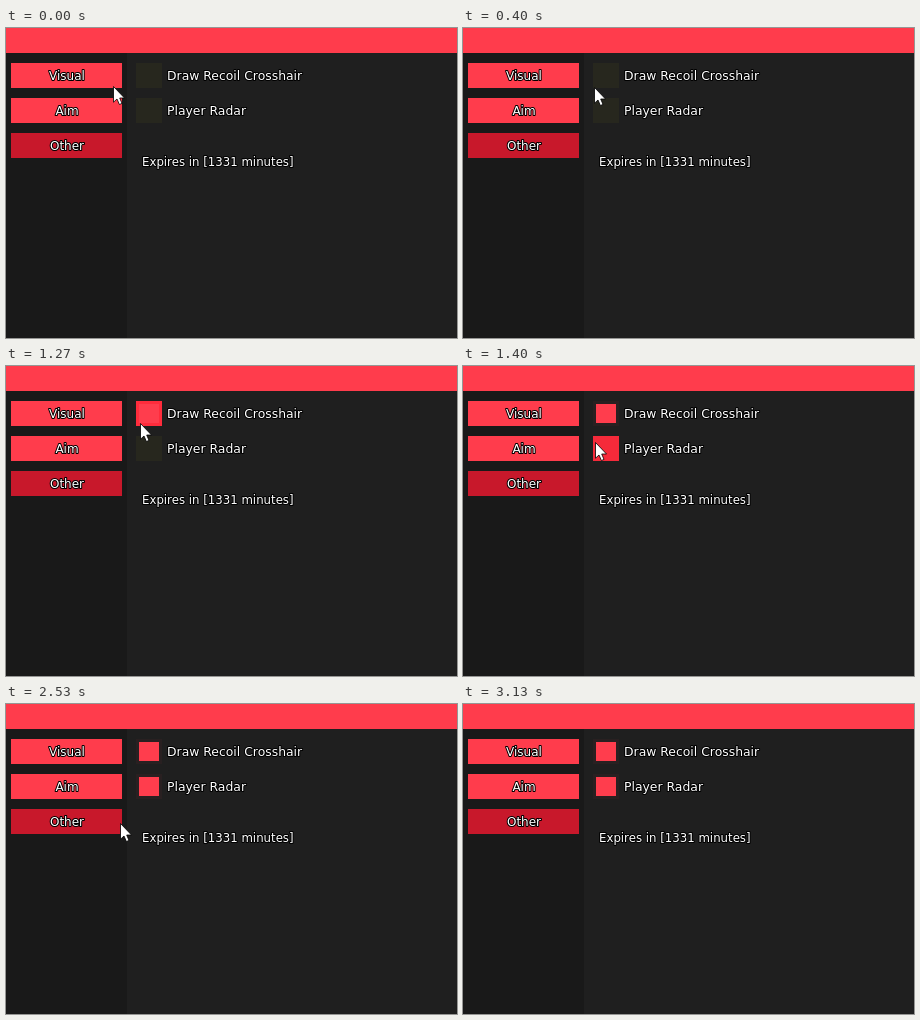
Write an HTML page that moves like this. It is 451x310 px and loops after 3.74 s.

```html
<!DOCTYPE html>
<html lang="en">
<head>
<meta charset="utf-8">
<title>Menu</title>
<style>
  html, body { margin: 0; width: 100%; height: 100%; overflow: hidden; background: #1f1f1f; }
  svg { display: block; width: 451px; height: 310px; }
  text {
    font: 12px "DejaVu Sans", sans-serif;
    fill: #fff; stroke: #000; stroke-width: 2px; stroke-linejoin: round; paint-order: stroke;
  }
  .label { font-size: 12.4px; }
  .note { font-size: 11.75px; }
  .tab { text-anchor: middle; }
  rect { shape-rendering: crispEdges; }
  .bright { fill: #ff3c4c; }
  .dim { fill: #c8182b; }

  .box { fill: #27271e; }
  .box.hover { fill: #f52a3a; }
  .box.checked { fill: #292021; }
  .box.hover.checked { fill: #ff2c3c; }
  .box.checked .mark { fill: #ff3d4d; }
</style>
</head>
<body>
<svg viewBox="0 0 451 310">
  <rect width="451" height="310" fill="#1f1f1f"/>
  <rect y="25" width="121" height="285" fill="#191919"/>
  <rect class="bright" width="451" height="25"/>

  <rect class="bright" x="5" y="35" width="111" height="25"/>
  <rect class="bright" x="5" y="70" width="111" height="25"/>
  <rect class="dim" x="5" y="105" width="111" height="25"/>
  <text class="tab" x="61" y="52">Visual</text>
  <text class="tab" x="61" y="87">Aim</text>
  <text class="tab" x="61" y="122">Other</text>

  <g id="crosshair" class="box" transform="translate(130 35)">
    <rect width="26" height="25"/><rect class="mark" x="3" y="3" width="20" height="19"/>
  </g>
  <g id="radar" class="box" transform="translate(130 70)">
    <rect width="26" height="25"/><rect class="mark" x="3" y="3" width="20" height="19"/>
  </g>
  <text class="label" x="161" y="52">Draw Recoil Crosshair</text>
  <text class="label" x="161" y="87">Player Radar</text>
  <text class="note" x="136" y="138">Expires in [1331 minutes]</text>

  <path id="cursor" d="M.5 .5V16.2L4 13L6.4 18.5L9 17.4L6.7 12H11.5Z"
        fill="#fff" stroke="#000" stroke-width=".8"/>
</svg>
<script>
  const LOOP = 3740;
  const STEP = 200 / 3; // the picture changes only on this beat, in ms
  const ROUNDING = 4;
  const byId = id => document.getElementById(id);

  const linear = p => p;
  const speedUp = p => p * p;
  const slowDown = p => 1 - (1 - p) ** 2;
  const smooth = p => p * p * (3 - 2 * p);

  // Pointer stops; each is reached by moving from beat "from" to beat "to".
  const home = { x: 107, y: 58 };
  const moves = [
    { from: 0, to: 8, x: 135, y: 57, easeX: smooth, easeY: linear, sag: 3 },
    { from: 11, to: 12, x: 135, y: 55, easeX: linear, easeY: linear, sag: 0 },
    { from: 18, to: 21, x: 132, y: 76, easeX: linear, easeY: speedUp, sag: 0 },
    { from: 34, to: 42, x: 96, y: 246, easeX: linear, easeY: speedUp, sag: 0 },
    { from: 42, to: 47, x: 78, y: 312, easeX: slowDown, easeY: slowDown, sag: 0 }
  ];

  const boxes = [
    { id: "crosshair", enter: 9, check: 19, leave: 20 },
    { id: "radar", enter: 21, check: 35, leave: 36 }
  ];

  function pointerAt(beat) {
    let { x, y } = home;
    for (const move of moves) {
      const p = Math.min(1, Math.max(0, (beat - move.from) / (move.to - move.from)));
      x += (move.x - x) * move.easeX(p);
      y += (move.y - y) * move.easeY(p) + move.sag * Math.sin(Math.PI * p);
    }
    return [Math.round(x), Math.round(y)];
  }

  function draw(time) {
    const beat = Math.floor((time + ROUNDING) / STEP);
    byId("cursor").setAttribute("transform", `translate(${pointerAt(beat)})`);
    for (const { id, enter, check, leave } of boxes) {
      const { classList } = byId(id);
      classList.toggle("hover", beat >= enter && beat < leave);
      classList.toggle("checked", beat >= check);
    }
  }

  const start = performance.now();
  function tick() {
    draw((performance.now() - start) % LOOP);
    requestAnimationFrame(tick);
  }
  tick();
</script>
</body>
</html>
```
